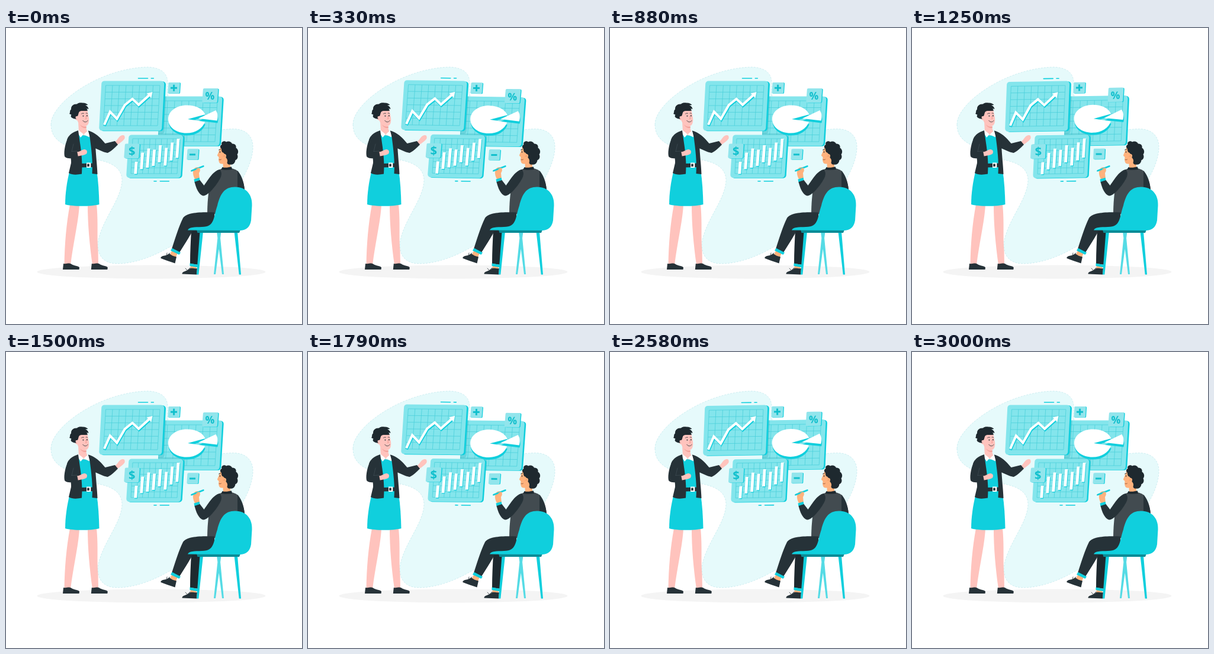
Write an HTML page with a canvas that moves like this. It is 500 px wide and 500 px high and loops after 3.04 s.

```html
<!DOCTYPE html>
<html lang="en">
<head>
<meta charset="utf-8">
<title>Business presentation</title>
<style>
html, body { margin: 0; width: 100%; height: 100%; overflow: hidden; background: #fff; }
canvas { display: block; width: 100vw; height: 100vh; }
</style>
</head>
<body>
<canvas id="stage"></canvas>
<script>
const SIZE = 500, LOOP = 3040, SWAY = 1500, FPS = 24;
const PIVOT = [262.5, 172];
const CYAN = '#10cfdd', PANEL = '#84e5ec', TILE = '#92e5ec', GRID = '#45ced9', DEEP = '#12c0cd';
const SHADE = 'rgba(14, 150, 165, .22)';
const DARK = '#263238', INK = '#1e292f', SKIN = '#ffc3bd', TAN = '#ffb27d', PALE = '#e6fafb';

const canvas = document.getElementById('stage');
const ctx = canvas.getContext('2d');
const scale = window.devicePixelRatio || 1;
canvas.width = canvas.height = SIZE * scale;

function fill(d, color) {
  ctx.fillStyle = color;
  ctx.fill(new Path2D(d));
}

function line(d, color, width, cap = 'round') {
  ctx.strokeStyle = color;
  ctx.lineWidth = width;
  ctx.lineCap = cap;
  ctx.lineJoin = 'miter';
  ctx.stroke(new Path2D(d));
}

function oval(x, y, rx, ry, color, turn = 0) {
  ctx.beginPath();
  ctx.ellipse(x, y, rx, ry, turn, 0, Math.PI * 2);
  ctx.fillStyle = color;
  ctx.fill();
}

function shifted(dx, dy, paint) {
  ctx.save();
  ctx.translate(dx, dy);
  paint();
  ctx.restore();
}

// Rounded slanted card; lean is how far the bottom edge sits to the left.
function card(x, y, w, h, lean, r, color) {
  const pts = [[x, y], [x + w, y], [x + w - lean, y + h], [x - lean, y + h]];
  ctx.beginPath();
  ctx.moveTo(x + w / 2, y);
  for (let i = 1; i <= 4; i++) {
    const a = pts[i % 4], b = pts[(i + 1) % 4];
    ctx.arcTo(a[0], a[1], b[0], b[1], r);
  }
  ctx.closePath();
  ctx.fillStyle = color;
  ctx.fill();
}

function slab(x, y, w, h, lean, r, depth, color = PANEL) {
  card(x + depth, y + depth * 0.3, w, h, lean, r, CYAN);
  card(x, y, w, h, lean, r, color);
}

function grid(x, y, w, h, lean, cols, rows) {
  let d = '';
  for (let i = 0; i <= cols; i++) {
    const gx = x + w * i / cols;
    d += `M${gx},${y}L${gx - lean},${y + h}`;
  }
  for (let j = 0; j <= rows; j++) {
    const gx = x - lean * j / rows, gy = y + h * j / rows;
    d += `M${gx},${gy}h${w}`;
  }
  line(d, GRID, 0.7, 'butt');
}

function glyph(text, x, y, size) {
  ctx.font = `700 ${size}px "Open Sans", Lato, sans-serif`;
  ctx.textAlign = 'center';
  ctx.textBaseline = 'alphabetic';
  ctx.fillStyle = DEEP;
  ctx.fillText(text, x, y);
}

function pieBoard() {
  slab(261, 115.5, 104.5, 83.5, 5, 5, 2.5);
  grid(261, 123, 96, 69, 4, 8, 6);
  // shadows cast by the two boards in front
  ctx.save();
  card(261, 115.5, 104.5, 83.5, 5, 5, 'transparent');
  ctx.clip();
  card(165, 93, 107, 86, 4.5, 5, SHADE);
  card(210, 178, 93, 76, 4.5, 5, SHADE);
  ctx.restore();
  const body = 'M307,154 L336.5,146 C332,136 320,130.5 306,130.5 C287,130.5 274,141 274,154 C274,167 287,177.5 305,177.5 C320,177.5 332,170 336,158.5 Z';
  const wedge = 'M325,152.8 L354.5,139 C357.5,144 358.5,150 356.5,156.5 Z';
  const both = color => { fill(body, color); fill(wedge, color); };
  shifted(0.8, 4, () => both(CYAN));
  both('#fff');
}

function lineBoard() {
  slab(161.5, 89.5, 106, 84, 4.5, 5, 2.8);
  grid(168.5, 97, 91.5, 68, 4, 8, 6);
  const trend = 'M166,163.5 L175.8,141.5 L187.3,153.5 L200.8,130 L213.5,119.8 L224,129.8 L243,112.5';
  shifted(0.8, 2, () => line(trend, CYAN, 4, 'butt'));
  line(trend, '#fff', 4, 'butt');
  fill('M247.5,108 L238,110.5 L245,118 Z', '#fff');
}

function barBoard() {
  slab(207.5, 180.5, 92, 72.5, 4.5, 5, 2.4);
  grid(214, 187, 78, 59, 3, 8, 6);
  const bars = [[226, 246.5], [210.5, 238.5], [203.5, 236], [205.5, 233], [198, 227], [202.5, 232.5], [193.5, 224], [187, 219.5]];
  bars.forEach(([top, low], i) => {
    const x = 216.3 + i * 10, lean = (low - top) * 0.075;
    const bar = `M${x + lean},${top} h4.8 L${x + 4.8},${low} h-4.8 Z`;
    shifted(0.8, 1.2, () => fill(bar, CYAN));
    fill(bar, '#fff');
  });
}

function boards(angle) {
  ctx.save();
  ctx.translate(...PIVOT);
  ctx.rotate(angle * Math.PI / 180);
  ctx.translate(-PIVOT[0], -PIVOT[1]);
  pieBoard();
  lineBoard();
  barBoard();
  slab(274.5, 92, 19.5, 18.5, 1.2, 1.5, 1.2, TILE);
  line('M278,101.2h11M283.6,95.7v11', DEEP, 3, 'butt');
  slab(333, 102, 25.5, 24, 1.8, 2, 1.4, TILE);
  glyph('%', 344.5, 121.2, 17.5);
  slab(201, 195.5, 25, 24.5, 1.8, 2, 1.4, TILE);
  glyph('$', 212.7, 215, 20);
  slab(306.5, 204.5, 19, 18, 1.2, 1.5, 1.2, TILE);
  line('M310,213.8h10', DEEP, 3, 'butt');
  line('M223.5,85h16M245.3,85h4M250,258.8h4M260.3,258.8h15', CYAN, 1.6);
  ctx.restore();
}

function backdrop() {
  const blob = 'M76,163 C76,126 160,67 240,66 C265,67 274,79 273,95 C272,115 275,140 300,160 C330,180 365,170 385,170.5 C409,171 418,187 417,203 C416,228 400,262 365,300 C318,348 248,398 188,398 C165,398 155,385 155,365 C160,325 196,290 196,256 C195,232 170,225 150,222 C130,200 76,205 76,163 Z';
  fill(blob, PALE);
  ctx.setLineDash([3, 2]);
  line(blob, '#a9dfe4', 0.5, 'butt');
  ctx.setLineDash([]);
  oval(245.5, 412, 193, 11.5, '#f4f4f4');
}

function woman() {
  // legs and shoes
  fill('M108,298 L124,299 C122,330 114,360 109,401 L98.5,401 C99,365 102,330 108,298 Z', SKIN);
  fill('M138,299 L153,298 C156,330 153.5,350 155.5,375 L156,400 L146,400 C141,365 138,330 138,299 Z', SKIN);
  const shoe = 'M97,398 C103,399 106,396 110,398.5 C115,402 122,401.5 124,404.5 L123.5,408 L96,408 Z';
  fill(shoe, DARK);
  shifted(47.8, 0, () => fill(shoe, DARK));
  // dress
  fill('M107,243 L153,240 C156,258 157,278 157.5,298 C142,302 112,301.5 100,298 C100,279 103,260 107,243 Z', CYAN);
  fill('M121,176 L143,178 L148,246 L124,247 Z', CYAN);
  // neck and head
  fill('M122,158 L134,164 L138,178 C136,184 127,182 123,176 Z', SKIN);
  fill('M120,141 C125,135 137,135 138,141 C139,148 141.5,154 139.5,160.5 C138,166.5 132,167.5 126.5,163.5 C123,161 121,159 120.5,156 C116,156 115,149 119,148.5 Z', SKIN);
  fill('M125,163 C129,167 133,167.5 136,166 L135.5,169 C131,169.5 127,167 125,163 Z', '#f3a39c');
  fill('M117,153.5 C111,153 108,149.5 110.5,146.5 L107,145 C109,143 107,139.5 110,137.5 C109.5,131.5 114,128 120,128.5 C123,125.5 127,126.5 129.5,126.5 C133,126 136,127.5 138.5,130 L134,130.5 C137,131.5 139,134 139.5,137 L136.3,136 L138,139.5 C132,141 127,138.5 123.8,141.5 C121.5,145 122.5,149 120,149 C117.5,148.5 116.5,151 119,153.5 Z', INK);
  oval(130.4, 148.6, 0.8, 1.2, DARK);
  oval(136.8, 148.2, 0.8, 1.2, DARK);
  line('M127.5,145 q2,-1.8 4,-0.8 M135,144 q1.5,-.8 2.7,.4', DARK, 0.8);
  line('M134.2,149 q2,3 1.5,4.2 h-1.5', '#ed8983', 0.8);
  line('M129.8,156.3 C132,160 136.5,159.3 138,156.5', DARK, 0.8);
  fill('M122,172 L131,179.5 L126,185 L121,177 Z M137.5,174 L131,180 L141,184.5 L141,177 Z', '#fff');
  // belt
  fill('M127,229 L147,228.5 V235 L127,235.5 Z', DARK);
  fill('M136,227.5 h7.3 v8.5 h-7.3 Z', '#fff');
  fill('M137.2,229.5 h3.6 v4.5 h-3.6 Z', DARK);
  // raised hand and sleeve
  fill('M184,192.5 C189,188.5 190,184 194,182 C197,180 201,181 200.5,184 C202,187 197,191.5 188.5,197 Z', SKIN);
  fill('M139,173.5 C150,176 159,184.5 167.5,195 L184,191 L189,197 C183,203 177,209 171.5,211 C163,209.5 156,205 148,202 Z', DARK);
  // jacket
  fill('M139,173.5 C146,176 150,181 151,190 C151,210 154,230 154.5,247 L145.5,246 C147,225 144,203 141.5,184 Z', DARK);
  fill('M122,173 C113,176 106,180 103,189 C104,203 111,218 110,228 L106,245 C112,248.5 120,248 128,246.5 C130,220 125,196 123,180 Z', DARK);
  fill('M119,209 C124,210 127,206 132,205 C137,205 138,209 136,212.5 C131,215.5 126,215 121,217 Z', SKIN);
  fill('M106,183 C101,191 97,208 99,217 C103,222 113,220 122,218 L120,208 L111,208.5 L114,194 Z', DARK);
  line('M111,208.5 L114,196 M111,208.5 L120,208', '#45525a', 0.6);
}

function chairLegs() {
  const light = '#55dbe5';
  fill('M358.5,344 h5 L354,416 h-3 Z M356,344 h5 L368,416 h-3 Z', light);
  fill('M327.5,344 h5.5 L325.3,416.5 h-3.3 Z M385.5,344 h5.5 L397,416.5 h-3.3 Z', CYAN);
}

function man() {
  // far leg
  fill('M312,401 L322,402 L321,409 L311,408 Z', TAN);
  fill('M313,340 L329,340 C328,360 327,380 325,400 L311,398 C311,378 312,360 313,340 Z', INK);
  fill('M310.5,397.5 L325,400 L324.5,404.5 L310.5,402 Z', CYAN);
  fill('M311,406 C315,405 320,407 323,406 L322,416.5 L297.5,415.5 C297,411 306,411 311,406 Z', DARK);
  line('M306,409 l-3,-3 M307,409 l4,-4', DARK, 0.8);
  chairLegs();
  // torso
  fill('M361,239 C372,235 384,236 392,242 C399,251 402,262 403,273 L385,310 L340,316 C340,290 343,262 349,247 Z', '#424b50');
  fill('M391,241 C398,250 402,261 403,273 L391,270 Z', DARK);
  // neck and head
  fill('M366,222 L379,220 L379,238 L367,238 Z', TAN);
  fill('M365,199 C360,203 360,209 357,214.5 C357,217 359,217 359.5,218 C359,223 359,227 362,229 C367,231 373,228 376,222 L377,204 Z', TAN);
  fill('M364.5,197 C362.5,192 369,189.5 372,192.5 C376,190 381,192.5 382,195.5 C387,195 389.5,199 388.5,202.5 C393,205 393,211 390.5,213.5 C393,218 390.5,222.5 387.5,223 C387,228.5 383,231.5 379,230.5 C376,231.5 373.5,229.5 373.5,227 C375,224 373.5,221 371.5,219 C369,218 369.5,212 367,210.5 C363,210 365,204.5 363,203 C361,201 362,198 364.5,197 Z', INK);
  oval(368.5, 216.8, 3.4, 4.2, TAN, 0.3);
  line('M367,217 q2,-3 3,0', '#dd8c5c', 0.7);
  oval(361.5, 209.5, 0.7, 1.2, DARK);
  line('M359.5,206 l3,-1.2', DARK, 0.9);
  line('M360,222.5 q2,1 3.5,-0.5', '#8b4d35', 0.8);
  fill('M365.5,235 C371,237 376,235 381,234.5 L382,239 C375,240 368,240 363.5,239 Z', INK);
  // near leg
  fill('M281,374 L291,378 L287,387 L277,383 Z', TAN);
  fill('M352,311.5 C330,311 306,311 299,321 C292,335 286,355 280,373 L292.5,380 C300,368 309,354 315,343 C332,343 346,341 353,334 Z', DARK);
  fill('M280.5,371.8 L295,379.2 L292.5,383 L278,376 Z', CYAN);
  fill('M276,381 C279,384 284,386 288,386.5 L285.5,397.5 C278,395 269,392 261.5,389 C261,383.5 271,386 276,381 Z', DARK);
  line('M271,385 l1,-5 M272,384 l5,-4', DARK, 0.8);
  // writing hand, pen, sleeve
  fill('M319.5,256 C316.5,251 315,245 316.5,240 C318,235 324,234 326,237 C329,238 328,242 326,245 L327,255 Z', TAN);
  line('M314,241 L333.3,233.5', CYAN, 2.8);
  line('M312.5,241.6 l2,-.7', DEEP, 1.2);
  oval(324.5, 238.3, 3.2, 1.6, TAN, -0.4);
  fill('M317.5,255.5 L326.5,252.8 L328,258.5 L318.5,261 Z', CYAN);
  fill('M318.5,260 L327.5,257 L334.5,266 C342,256 350,241 361,239 C368,247 361,256 355,265 C348,274 340,283 333,283.5 C325,281 321,270 318.5,260 Z', DARK);
}

function chairSeat() {
  fill('M322,341 H396 L394,346 H323.5 Z', '#0b8b96');
  fill('M307,341.5 C309,336 318,336.5 331,336 C353,336 350,320 357,300 C362,280 369,268.5 387,268.5 C407,268.5 416.5,283 415.5,300 L414,325 C412,337 405,342 395,342 Z', CYAN);
}

// Each swing sets off slowly, turning from +1 to -1 degree and back.
function swayAngle(time) {
  const p = time % SWAY / SWAY;
  const ease = x => Math.pow(x, 1.7);
  if (p < 0.25) return ease(p / 0.25);
  if (p < 0.75) return 1 - 2 * ease((p - 0.25) / 0.5);
  return ease((p - 0.75) / 0.25) - 1;
}

function draw(time) {
  const step = Math.min(72, Math.floor((time % LOOP + 5) * FPS / 1000));
  ctx.setTransform(scale, 0, 0, scale, 0, 0);
  ctx.fillStyle = '#fff';
  ctx.fillRect(0, 0, SIZE, SIZE);
  backdrop();
  boards(swayAngle(step * 1000 / FPS));
  woman();
  man();
  chairSeat();
}

let start;
function tick(now) {
  if (start === undefined) start = now;
  draw(now - start);
  requestAnimationFrame(tick);
}
draw(0);
requestAnimationFrame(tick);
</script>
</body>
</html>
```
